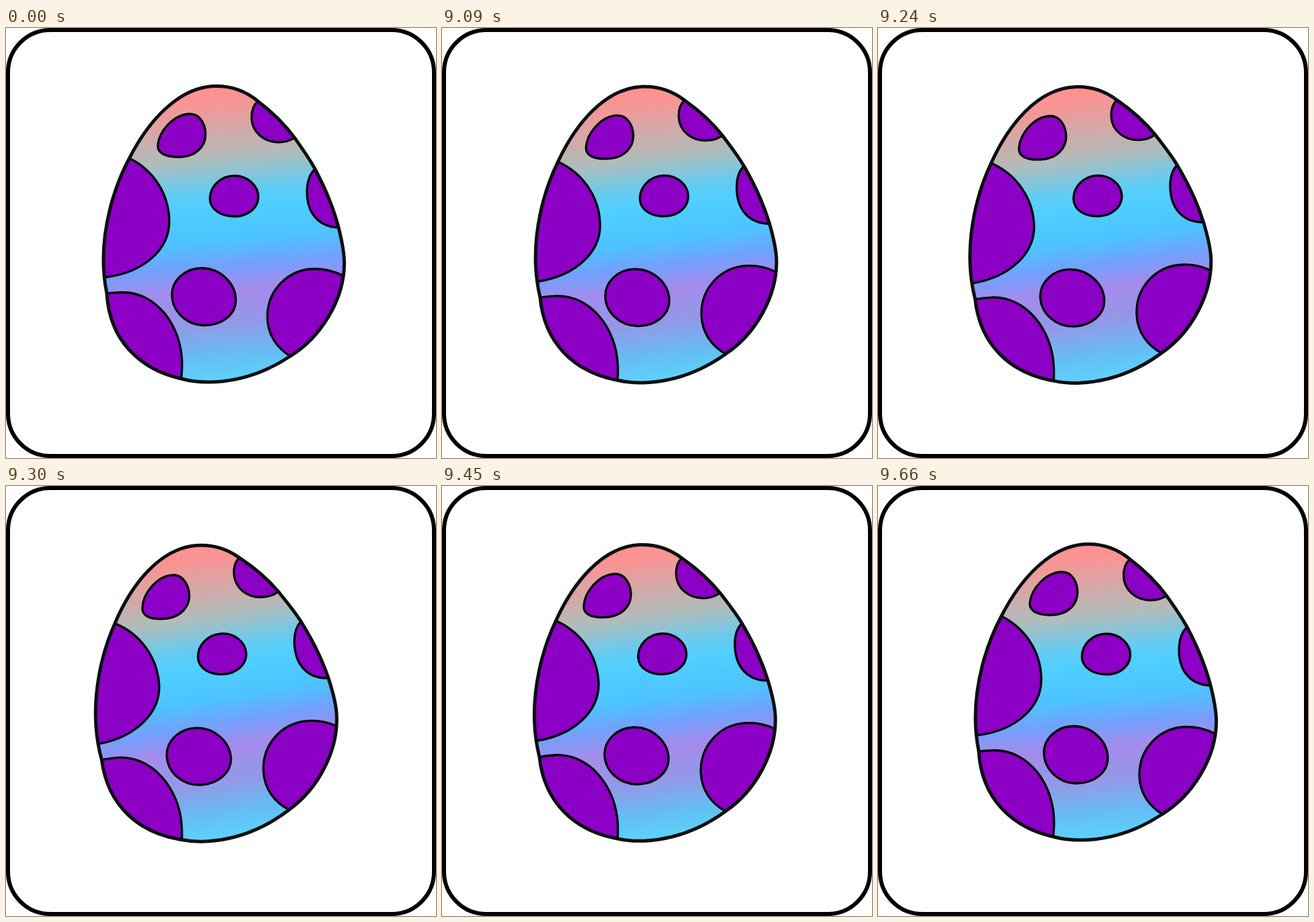
These frames come from a looping animation (640x640 px, 9.75 s). An HTML page:

```html
<!DOCTYPE html>
<html lang="en">
<head>
<meta charset="utf-8">
<title>Wobbling egg</title>
<style>
  html, body { margin: 0; width: 100%; height: 100%; overflow: hidden; background: #fff; }
  svg { display: block; width: 100%; height: 100%; }
</style>
</head>
<body>
<svg viewBox="0 0 640 640">
  <defs>
    <linearGradient id="shell" gradientUnits="userSpaceOnUse" x1="290" y1="84" x2="328" y2="528">
      <stop offset="0" stop-color="#ff9090"/>
      <stop offset=".06" stop-color="#f99494"/>
      <stop offset=".25" stop-color="#b0bcbb"/>
      <stop offset=".36" stop-color="#62ccf2"/>
      <stop offset=".41" stop-color="#50cfff"/>
      <stop offset=".53" stop-color="#4dc2ff"/>
      <stop offset=".61" stop-color="#73a0fd"/>
      <stop offset=".69" stop-color="#a58bec"/>
      <stop offset=".8" stop-color="#9398e7"/>
      <stop offset=".91" stop-color="#64bef4"/>
      <stop offset="1" stop-color="#5cd4fb"/>
    </linearGradient>
    <path id="outline" d="M313 86.5C337 86.5 357 94 375 109C396 125 414 142 430 164C442 181 452 195 460 210
      C476 240 488 270 495 297C500 317 503.5 335 503.5 350C503.5 405 468 461 423 488.5
      C386 513 345 527 300 527C285 527 274 525.5 261 522C198 508 154 464 150 395
      C147 380 145 362 145 345C145 295 159 240 183.5 194C212 138 258 86.5 313 86.5Z"/>
    <clipPath id="inside"><use href="#outline"/></clipPath>
  </defs>
  <rect x="3" y="3" width="634" height="634" rx="63" fill="#fff" stroke="#000" stroke-width="6"/>
  <g id="egg">
    <use href="#outline" fill="url(#shell)"/>
    <g clip-path="url(#inside)" fill="#8b00c4" stroke="#000" stroke-width="3.3">
      <path d="M226 174C228 153 250 128 274 128C290 128 297 145 297 158C297 176 283 192 257 192C237 192 225 186 226 174Z"/>
      <path d="M303.5 254C303.5 236 319 220 340 220C360 220 375.5 235 375.5 251C375.5 268 360 280.5 340 280.5C320 280.5 303.5 270 303.5 254Z"/>
      <path d="M247 397C247 375 267 357.5 291 357.5C320 357.5 342 381 342 405C342 427 321 442.5 296 442.5C268 442.5 247 421 247 397Z"/>
      <path d="M375 109C368 115 365.5 124 365.5 133C365.5 155 384 170 406 170C415 170 423 168 430 163L450 120Z"/>
      <path d="M460 210C451 218 448 232 448 245C448 275 465 296 495 297L530 250Z"/>
      <path d="M184 194C220 212 243 248 243 288C243 330 205 364 148 371L100 280Z"/>
      <path d="M151 395C158 394 165 393.5 174 393.5C225 393.5 262 445 262 500C262 508 261.5 515 261 521L200 580L80 450Z"/>
      <path d="M502 369C489 362 475 358.5 460 358.5C420 358.5 389 390 389 430C389 455 402 476 424 489L480 520L540 400Z"/>
    </g>
    <use href="#outline" fill="none" stroke="#0b0f10" stroke-width="5"/>
  </g>
</svg>
<script>
  const LOOP = 9750, START = 9000, STEP = 30;
  const egg = document.getElementById('egg');

  // Zigzag turning points: [step, degrees]
  const swing = [[0, 0], [1.55, -7.5], [5.5, 7.5], [9.15, -7.5], [12.75, 7.5],
                 [16.1, -7.5], [20.5, 6.5], [22, 0]];

  function tilt(n) {
    if (n <= 0 || n >= 22) return 0;
    const i = swing.findIndex(p => p[0] > n);
    const [n0, a0] = swing[i - 1], [n1, a1] = swing[i];
    return a0 + (a1 - a0) * (n - n0) / (n1 - n0);
  }

  function draw(t) {
    const n = Math.floor((t % LOOP - START) / STEP);
    egg.setAttribute('transform', `rotate(${tilt(n).toFixed(3)} 327 511)`);
  }

  let begin;
  function tick(now) {
    begin ??= now;
    draw(now - begin);
    requestAnimationFrame(tick);
  }
  draw(0);
  requestAnimationFrame(tick);
</script>
</body>
</html>
```
